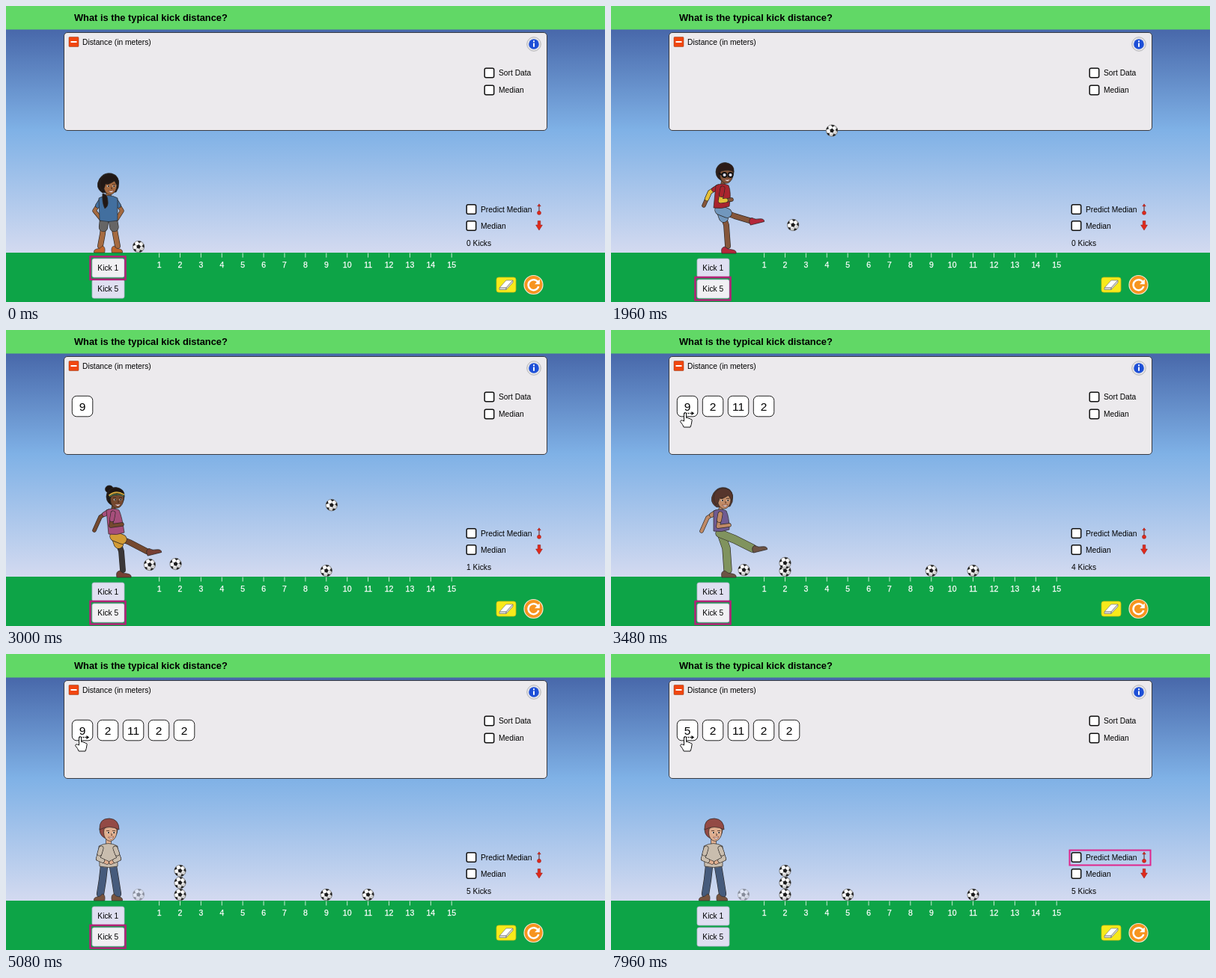
Recreate the animation shown at these times as an HTML page. Size 800x396 px, loop 8000 ms.

```html
<!DOCTYPE html>
<html lang="en">
<head>
<meta charset="utf-8">
<title>Kick distance</title>
<style>
html, body { margin: 0; height: 100%; overflow: hidden; }
svg { display: block; width: 800px; height: 396px; font: 10.25px "Liberation Sans", Arial, sans-serif; }
.limb { fill: none; stroke-linecap: round; stroke-linejoin: round; }
.ink { stroke: #2b2725; stroke-width: .7; }
.mid { text-anchor: middle; }
.focus { fill: none; stroke: #b32178; stroke-width: 2.6; }
</style>
</head>
<body>
<svg viewBox="0 0 800 396">
  <defs>
    <linearGradient id="sky" x2="0" y2="1">
      <stop stop-color="#4868aa"/><stop offset=".45" stop-color="#7fb1e6"/><stop offset="1" stop-color="#d3daf0"/>
    </linearGradient>
    <radialGradient id="shade" cx=".4" cy=".35">
      <stop offset=".6" stop-color="#fff"/><stop offset="1" stop-color="#cfcfcf"/>
    </radialGradient>
    <clipPath id="round"><circle r="7.8"/></clipPath>
    <g id="ball"></g>
  </defs>
  <rect width="800" height="396" fill="#61d866"/>
  <rect y="31.500" width="800" height="298.500" fill="url(#sky)"/>
  <rect y="330" width="800" height="66" fill="#0da447"/>
  <text x="91" y="20" font-size="12.85" font-weight="bold">What is the typical kick distance?</text>
  <rect x="77.500" y="35.500" width="645" height="131" rx="4.500" fill="#eceaed" stroke="#383a42"/>
  <rect x="84" y="41.5" width="13" height="13" rx="1" fill="#f1460f" stroke="#8d3414" stroke-width=".5"/>
  <path d="M86.5 48h8" stroke="#fff" stroke-width="2"/>
  <text x="102" y="52">Distance (in meters)</text>
  <circle cx="705" cy="51" r="9.3" fill="#e4e4e8" stroke="#aaa" stroke-width=".8"/>
  <circle cx="705" cy="51" r="6.8" fill="#1d4fd7"/>
  <path d="M705 49.6v5.2M705 46.3v2" stroke="#fff" stroke-width="1.9"/>
  <g id="checks"></g>
  <g fill="#e02a1c" stroke="#8c1710" stroke-width=".5">
    <path d="M712 267v9" stroke="#5a2020" stroke-width="1"/>
    <path d="M712 264.800l2.200 3h-4.400z"/><circle cx="712" cy="276.800" r="2.500"/>
    <path d="M710.2 287.5h3.6v5.5h2.6l-4.4 7-4.4-7h2.6z"/>
  </g>
  <g id="ticks"></g>
  <g id="buttons" class="mid"></g>
  <rect x="655" y="363" width="26" height="20" rx="3" fill="#f8ea1b" stroke="#c5b913" stroke-width=".8"/>
  <g stroke="#777" stroke-width=".7">
    <path d="M659 377l9-10h9l-9 10z" fill="#fff"/><path d="M659 377v2.5h9v-2.5zM668 377v2.5l9-9.5v-3z" fill="#ddd"/>
  </g>
  <circle cx="704.5" cy="373" r="12.5" fill="#f7941e" stroke="#f6e6d4" stroke-width="1.2"/>
  <path d="M710.5 369.5a7 7 0 1 0 .8 5.5" fill="none" stroke="#fff" stroke-width="2.5"/>
  <path d="M712.8 365.5v6.8h-6.8z" fill="#fff"/>
  <text id="count" x="615" y="320.5"></text>
  <g id="cards" class="mid" font-size="15.5"></g>
  <g id="hand">
    <path d="M97.5 120v-8.5q1.5-2.5 3 0v6q3-1 3.2 1 2.5-.5 2.6 1 1.9-.4 1.9 1.2l-1 5.8-1.2 3.5h-8.8l-1.7-3.5-3-4q.8-3 5-.5z" fill="#fff" stroke="#111"/>
    <path d="M97 111.5h11" stroke="#111" stroke-width="1.3" stroke-dasharray="1.7 1.2"/>
    <path d="M107.5 109l3.7 2.5-3.7 2.5z"/>
  </g>
  <g id="people"></g>
  <rect id="lineFocus" x="191" y="169.8" width="418" height="184" class="focus" style="stroke:#dc5aa2;stroke-width:1.8"/>
  <g id="balls"></g>
  <rect id="ballFocus" x="-10.3" y="-10.6" width="20.6" height="20.6" fill="none" stroke="#dc1482" stroke-width="1.9" stroke-dasharray="4.5 2.8"/>
  <rect id="kickFocus" x="112.5" width="47" height="30.5" class="focus"/>
  <rect id="medianFocus" x="612.5" y="262.5" width="108" height="20" class="focus" style="stroke:#e0258c;stroke-width:2"/>
</svg>
<script>
const $ = id => document.getElementById(id);
const LOOP = 8000, START_X = 177, GROUND = 322;
const meterX = m => 204.6 + 27.9 * (m - 1);
const show = (el, on) => el.setAttribute('visibility', on ? 'visible' : 'hidden');
const place = (el, x, y) => el.setAttribute('transform', `translate(${x} ${y})`);
const range = n => [...Array(n).keys()];

$('checks').innerHTML = [[639, 83, 'Sort Data'], [639, 106, 'Median'], [615, 265.5, 'Predict Median'], [615, 287.5, 'Median']]
  .map(([x, y, label]) => `<rect x="${x + .2}" y="${y + .2}" width="12.5" height="12.5" rx="2" fill="#fff" stroke="#111" stroke-width="1.5"/>
    <text x="${x + 19}" y="${y + 10.3}">${label}</text>`).join('');
$('ticks').innerHTML = range(15).map(i => `<path d="M${meterX(i + 1)} 330.5v6" stroke="#c9ecd3"/>
  <text x="${meterX(i + 1)}" y="350" class="mid" font-size="10.5" fill="#fff" stroke="#fff" stroke-width=".25">${i + 1}</text>`).join('');
$('buttons').innerHTML = [[338, 'Kick 1'], [366, 'Kick 5']].map(([y, label]) =>
  `<rect x="115" y="${y}" width="43" height="25" rx="2.5" stroke="#b4b4cf" stroke-width=".8"/>
   <text x="136.3" y="${y + 16.3}">${label}</text>`).join('');
$('cards').innerHTML = range(5).map(i => `<g><rect x="${88.3 + 34 * i}" y="88.3" width="27.5" height="27.5" rx="6" fill="#fff" stroke="#222"/>
  <text x="${102 + 34 * i}" y="107.5"></text></g>`).join('');

const pentagon = (r, turn) => range(5).map(i => {
  const a = (i * 72 + turn) * Math.PI / 180;
  return `${(r * Math.sin(a)).toFixed(2)},${(-r * Math.cos(a)).toFixed(2)}`;
}).join(' ');
$('ball').innerHTML = `<circle r="7.8" fill="url(#shade)"/><g clip-path="url(#round)" fill="#1c1c1c">
  <polygon points="${pentagon(3, 10)}"/>` + range(5).map(i => `<g transform="rotate(${i * 72 + 10})">
  <path d="M0-3V-7" stroke="#888" stroke-width=".6"/><polygon points="${pentagon(2.5, 180)}" transform="translate(0 -7.5)"/></g>`).join('') +
  `</g><circle r="7.7" fill="none" stroke="#555" stroke-width=".6"/>`;

// Characters. face: centre of the face in the kicking pose; foot: tip of the kicking leg.
const kickers = [
  { skin: '#a56a40', hair: '#211815', style: 'tail', top: '#426f9f', bottom: '#666565', shoe: '#c0662b', face: [153, 242], hip: 279, foot: [188, 295] },
  { skin: '#85563a', hair: '#2c1b17', style: 'glasses', top: '#a9242e', sleeve: '#a9242e', arm: '#e5c038', bottom: '#7197bd', shoe: '#b5273a', face: [153, 227], hip: 268, foot: [194, 287] },
  { skin: '#d99b70', hair: '#3a241b', style: 'short', top: '#d98b2b', bottom: '#45526f', shoe: '#4b4b52', face: [151, 229], hip: 269, foot: [195, 291] },
  { skin: '#75492f', hair: '#1d1512', style: 'bun', top: '#a64e7b', bottom: '#d29b35', shoe: '#784034', blade: true, face: [147, 228], hip: 271, foot: [197, 296] },
  { skin: '#c08a66', hair: '#56352c', style: 'bob', top: '#6f5b92', sleeve: '#c08a66', bottom: '#80935e', shoe: '#6d5344', long: true, face: [150, 229], hip: 267, foot: [198, 292] },
  { skin: '#dfae8f', hair: '#934a45', style: 'cap', top: '#c9bdae', arm: '#c9bdae', bottom: '#465b7c', shoe: '#78543f', long: true, face: [138, 240], hip: 283 }
];
const INK = '#2b2725';
const limb = (points, width, color) => [[width + 1.3, INK], [width, color]].map(([w, c]) =>
  `<path class="limb" d="M${points.join('L')}" stroke="${c}" stroke-width="${w}"/>`).join('');
const oval = (x, y, rx, ry, fill) => `<ellipse class="ink" cx="${x}" cy="${y}" rx="${rx}" ry="${ry}" fill="${fill}"/>`;
const shape = (d, fill) => `<path class="ink" d="${d}" fill="${fill}"/>`;
const middle = (a, b) => [(a[0] + b[0]) / 2, (a[1] + b[1]) / 2];
const shoe = (k, [x, y], turn = 0, flip = 1) => `<g transform="translate(${x} ${y}) rotate(${turn}) scale(${flip} 1)">
  ${shape('M-9 4Q-11-4-5-5Q-1-1 5-1Q11 0 10 4Z', k.shoe)}</g>`;
const leg = (k, hip, knee, foot, width, shin = k.skin) => k.long
  ? limb([hip, knee, foot], width, k.bottom)
  : limb([middle(hip, knee), knee, foot], 6.5, shin) + limb([hip, middle(hip, knee)], width + 2, k.bottom);
const arm = (k, a, b, c) => limb([a, b, c], 4.2, k.skin) +
  (k.arm ? limb([a, b, middle(b, c)], 4.8, k.arm) : '') +
  limb([a, middle(a, b)], 5.5, k.sleeve || k.top);

function head(k, [x, y]) {
  const { style, hair, skin } = k, full = style === 'tail' || style === 'bob';
  let out = style === 'bun' ? oval(-9, -15, 5.5, 5, hair) : '';
  out += full ? shape('M-9 8Q-20 1-13-11Q-7-20 3-18Q15-15 12 1L9 7Z', hair) : oval(-1, -5, 12, 12.5, hair);
  out += shape('M-7-6Q-9 4-3 9Q2 12 6 8Q11 3 10-6Q1-14-7-6Z', skin);
  if (full) out += shape('M-10 5Q-16-6-9-14Q-1-20 8-15Q15-9 11-1Q8-5 7-8Q1-3-5-4Q-6 2-10 5Z', hair);
  else if (style === 'cap') out += shape('M-13-5Q-14-20 0-20Q13-19 13-5Q0-12-13-5Z', hair);
  else out += shape('M-11 1Q-14-16 0-17Q12-16 11-5Q5-9-6-6Z', hair);
  if (style === 'bun') out += '<path class="limb" d="M-9-7Q0-14 10-8" stroke="#d0a63c" stroke-width="2"/><path class="limb" d="M-9-5Q0-11 10-6" stroke="#568f62"/>';
  out += `<g fill="#fff"><ellipse cx="-1.5" cy="-1" rx="1.5" ry="1.3"/><ellipse cx="6" cy="-1" rx="1.5" ry="1.3"/></g>
    <circle cx="-1.2" cy="-1" r="1"/><circle cx="6.2" cy="-1" r="1"/>
    <path d="M-4-3.500h4M4-3.500h4M2.500 0l1.200 2.500h-1.500" fill="none" stroke="#321c15" stroke-width=".7"/>
    <path d="M-1.500 5Q3 6 6 4.500Q4.500 8 2 7.500Q0 7-1.500 5Z" fill="#fff" stroke="#6b281d" stroke-width=".6"/>`;
  if (style === 'glasses') out += '<g fill="#dde" stroke="#111" stroke-width="1.8"><circle cx="-1.5" cy="-1" r="3"/><circle cx="6.5" cy="-1" r="3"/></g><path d="M-9-3l5 2" stroke="#111" stroke-width="2"/>';
  return `<g transform="translate(${x} ${y})">${out}</g>`;
}

function action(k, kicking) {
  const [x, y] = k.face, h = k.hip, f = k.foot;
  const swing = kicking
    ? leg(k, [145, h + 5], [165, h + 13], [f[0] - 9, f[1]], 10) + shoe(k, f, -14)
    : leg(k, [145, h + 4], [140, h + 19], [124, 309], 10) + shoe(k, [123, 314], 45);
  const stand = leg(k, [147, h + 5], [154, h + 25], [156, 321], 10, k.blade ? '#3a3738' : k.skin) + shoe(k, [157, 327]);
  return `<g transform="translate(${kicking ? 0 : -8} 0)">` +
    arm(k, [x - 10, y + 15], [x - 21, y + 22], [x - 29, y + 40]) + (kicking ? stand + swing : swing + stand) +
    limb([[x - 3, y + 8], [x - 4, y + 13]], 4.5, k.skin) +
    shape(`M${x - 13} ${y + 13}Q${x - 4} ${y + 9} ${x + 4} ${y + 13}Q${x + 8} ${y + 22} 158 ${h}Q148 ${h + 4} 137 ${h + 2}Z`, k.top) +
    arm(k, [x - 4, y + 17], [x - 7, y + 34], [x + 8, y + 32]) + head(k, k.face) +
    (k.style === 'tail' ? limb([[x - 8, y + 9], [x - 11, y + 19]], 4, k.hair) : '') + '</g>';
}

function standing(k) {
  const tail = k.style === 'tail', h = k.hip + (tail ? 8 : 1);
  const shoulder = 260, elbows = tail ? [118, 155] : [123, 151], hands = tail ? [127, 148] : [135, 140];
  const side = i => arm(k, [[127, 146][i], shoulder], [elbows[i], 274], [hands[i], tail ? 285 : 279]);
  const legs = [[131, 129, 126], [143, 146, 149]].map(([hip, knee, foot]) =>
    leg(k, [hip, h], [knee, h + 18], [foot, 321], 9)).join('');
  return legs + shoe(k, [125, 326], 0, -.75) + shoe(k, [148, 326], 0, .75) + (tail ? side(0) + side(1) : '') +
    limb([[137, 248], [137, 255]], 6, k.skin) +
    shape(`M124 257Q137 250 149 257L149 ${h}Q137 ${h + 3} 125 ${h}Z`, k.top) +
    (tail ? '' : side(0) + side(1)) + head(k, [138, tail ? 242 : 240]) +
    (tail ? shape('M129 251Q136 252 136 261Q137 268 132 271Q128 263 129 251Z', k.hair) : '');
}

// Every kick: start time, landing meter, height of the arc, place in the stack.
const kicks = [[1083, 11, 164, 0], [1674, 9, 37.4, 0], [2230, 2, 23.5, 0], [2848, 2, 10.2, 1], [3472, 2, 26.7, 2]]
  .map(([start, meter, height, slot]) => ({ start, meter, height, slot, flight: 178.1 * Math.sqrt(height) }));
const landing = k => k.start + k.flight;
const byLanding = [...kicks].sort((a, b) => landing(a) - landing(b));
const poise = k => k.start - 190;
const lastLanding = landing(kicks[4]);
const dragged = kicks[1];
const draggedMeter = t => 9 - [6120, 6560, 6880, 7200].filter(s => t >= s).length;

const poses = [];
const addPose = (markup, from, to) => poses.push({ markup, from, to });
addPose(standing(kickers[0]), 0, poise(kicks[0]));
kicks.forEach((k, i) => {
  addPose(action(kickers[i], false), poise(k), k.start);
  addPose(action(kickers[i], true), k.start, kicks[i + 1] ? poise(kicks[i + 1]) : lastLanding);
});
addPose(standing(kickers[5]), lastLanding, LOOP);
$('people').innerHTML = poses.map(p => `<g>${p.markup}</g>`).join('');
$('balls').innerHTML = '<use href="#ball"/>'.repeat(6);
const ghost = $('balls').children[5];
ghost.setAttribute('opacity', .4);
place(ghost, START_X, GROUND);

function ballAt(k, t) {
  const meter = k === dragged ? draggedMeter(t) : k.meter;
  const p = Math.min(1, Math.max(0, (t - k.start) / k.flight));
  const rise = Math.min(1, Math.max(0, (t - landing(k)) / 160));
  return [START_X + (meterX(meter) - START_X) * p,
    GROUND - 4 * k.height * p * (1 - p) - 16 * k.slot * rise * (2 - rise)];
}

function draw(t) {
  poses.forEach((p, i) => show($('people').children[i], t >= p.from && t < p.to));
  kicks.forEach((k, i) => {
    const ball = $('balls').children[i];
    show(ball, i === 0 || t >= poise(k));
    place(ball, ...ballAt(k, t));
  });
  show(ghost, t >= lastLanding);

  const landed = byLanding.filter(k => t >= landing(k)).length;
  $('count').textContent = `${landed} Kicks`;
  byLanding.forEach((k, i) => {
    const card = $('cards').children[i];
    show(card, i < landed);
    card.lastElementChild.textContent = k === dragged ? draggedMeter(t) : k.meter;
  });
  show($('hand'), landed > 1);

  const focus = t < 520 ? 'kick1' : t < 5400 ? 'kick5' : t < 7640 ? 'ball' : 'median';
  show($('kickFocus'), focus.startsWith('kick'));
  $('kickFocus').setAttribute('y', focus === 'kick1' ? 335.3 : 363);
  $('buttons').querySelectorAll('rect').forEach((r, i) =>
    r.setAttribute('fill', focus === ['kick1', 'kick5'][i] ? '#f1f0f3' : '#dfdff1'));
  show($('lineFocus'), focus === 'ball');
  show($('ballFocus'), focus === 'ball');
  place($('ballFocus'), ...ballAt(dragged, t));
  show($('medianFocus'), focus === 'median');
}

const begin = performance.now();
function tick() {
  draw((performance.now() - begin) % LOOP);
  requestAnimationFrame(tick);
}
draw(0);
requestAnimationFrame(tick);
</script>
</body>
</html>
```
